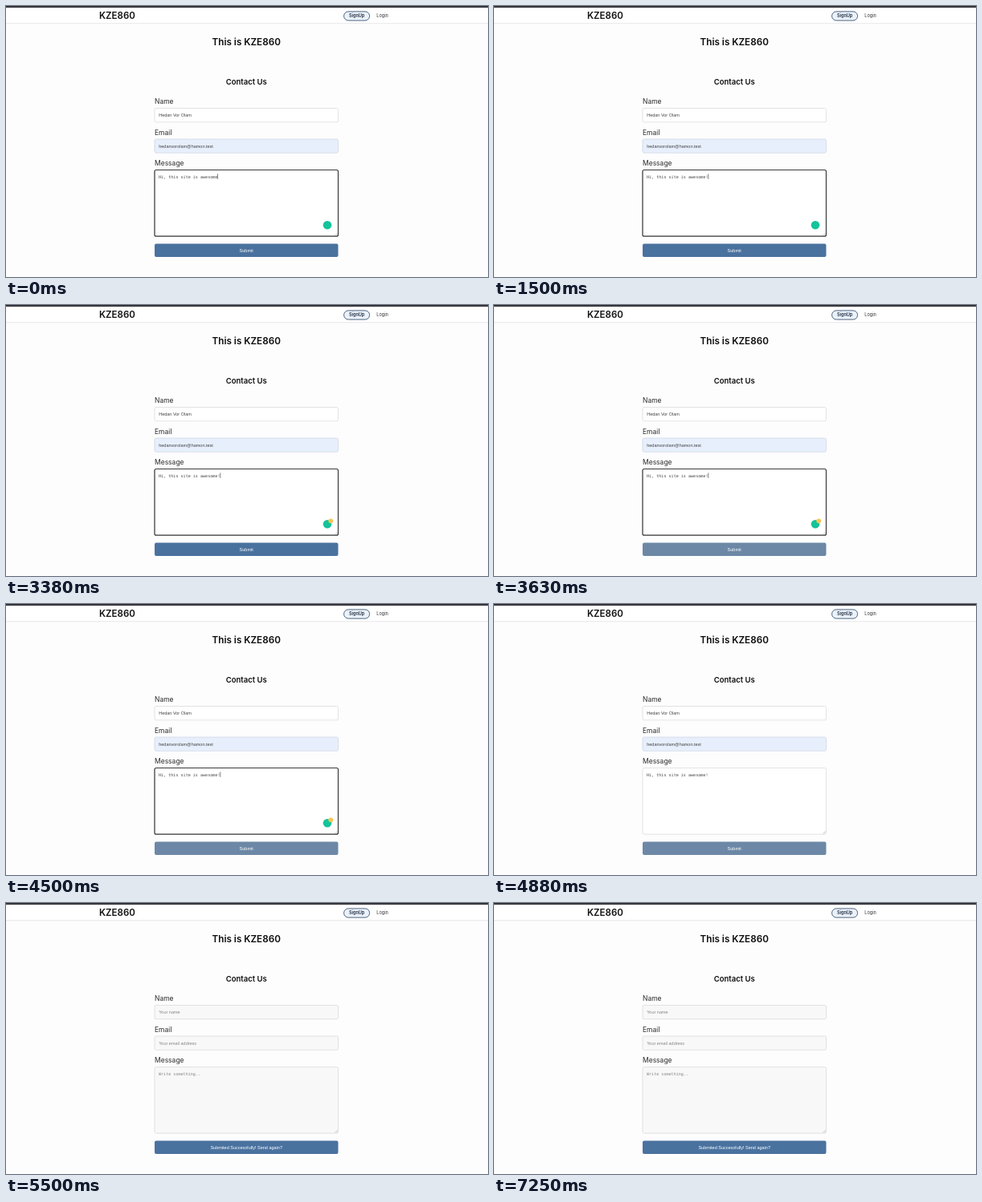
These frames come from a looping animation (600x338 px, 8 s). An HTML page with a canvas:

```html
<!DOCTYPE html>
<html lang="en">
<head>
<meta charset="utf-8">
<title>Contact form</title>
<style>
html, body { margin: 0; width: 100%; height: 100%; overflow: hidden; background: #fdfdfe; }
canvas { display: block; width: 600px; height: 338px; }
</style>
</head>
<body>
<canvas id="stage"></canvas>
<script>
const W = 600, H = 338, LOOP = 8000;
const canvas = document.getElementById('stage');
const ctx = canvas.getContext('2d');
const ratio = window.devicePixelRatio || 1;
canvas.width = W * ratio;
canvas.height = H * ratio;

const SANS = '"Liberation Sans", Arial, sans-serif';
const MONO = '"DejaVu Sans Mono", monospace';
const WEB = 'Inter, sans-serif';
const LEFT = 185, WIDTH = 228.5, MID = 299.2;
const SITE = 'KZE860';

// Times in ms
const TYPED = 1130, BADGE = 2000, HOVER = 3630, BLUR = 4750, RELOAD = 5380, STYLED = 5500;
const BLINK = 530;

// Vertical layout before and after the web font is loaded
const plain = {
  logo: 13.6, nav: 11.5, pill: 4.2, line: 17, title: 47, heading: 91.5,
  labels: [111, 147, 183], boxes: [115.3, 151.3, 187.3], button: 279.5,
  face: SANS, sizes: { logo: 12, title: 12, heading: 9.36, label: 8, nav: 5.5 },
  bold: 700, medium: 700
};
const styled = {
  logo: 16.1, nav: 14.1, pill: 6.9, line: 21, title: 49.1, heading: 97.6,
  labels: [122.1, 160.5, 199], boxes: [127.5, 166, 204.5], button: 296.4,
  face: WEB, sizes: { logo: 11.5, title: 11.7, heading: 9.5, label: 8.5, nav: 5.5 },
  bold: 600, medium: 500
};

function text(str, x, y, size, color, face, weight = 400, align = 'left') {
  ctx.font = `${weight} ${size}px ${face}`;
  ctx.textAlign = align;
  ctx.fillStyle = color;
  ctx.fillText(str, x, y);
}

function box(x, y, w, h, r, fill, stroke, line = 0.6) {
  ctx.beginPath();
  ctx.roundRect(x, y, w, h, r);
  ctx.fillStyle = fill;
  ctx.fill();
  if (!stroke) return;
  ctx.strokeStyle = stroke;
  ctx.lineWidth = line;
  ctx.stroke();
}

function dot(x, y, r, color) {
  ctx.beginPath();
  ctx.arc(x, y, r, 0, Math.PI * 2);
  ctx.fillStyle = color;
  ctx.fill();
}

function drawPage(p) {
  ctx.fillStyle = '#fdfdfe';
  ctx.fillRect(0, 0, W, H);
  ctx.fillStyle = '#fff';
  ctx.fillRect(0, 0, W, p.line);
  ctx.fillStyle = '#ededf0';
  ctx.fillRect(0, p.line, W, 1);
  ctx.fillStyle = '#f8f8fa';
  ctx.fillRect(0, p.line + 1, W, 1);
  ctx.fillStyle = '#38383c';
  ctx.fillRect(0, 0, W, 2);
  ctx.fillStyle = '#d4d4d8';
  ctx.fillRect(0, 2, W, 0.6);

  const s = p.sizes;
  text(SITE, 116, p.logo, s.logo, '#111', p.face, p.bold);
  box(420.6, p.pill, 32, 11.2, 5.6, '#eaf1f9', '#3b5573', 0.9);
  text('SignUp', 436.6, p.nav, s.nav, '#1d2b40', p.face, p.bold, 'center');
  text('Login', 461.3, p.nav, s.nav, '#4c4c50', p.face, p.medium);
  text('This is ' + SITE, MID, p.title, s.title, '#0c0c0c', p.face, p.bold, 'center');
  text('Contact Us', MID, p.heading, s.heading, '#0c0c0c', p.face, p.bold, 'center');
  ['Name', 'Email', 'Message'].forEach((label, i) =>
    text(label, LEFT, p.labels[i], s.label, '#2a2a2a', p.face));
}

function drawResizer(bottom) {
  ctx.strokeStyle = '#888';
  ctx.lineWidth = 0.4;
  ctx.beginPath();
  for (const d of [1.6, 3.4]) {
    ctx.moveTo(412.8 - d, bottom - 0.7);
    ctx.lineTo(412.8, bottom - 0.7 - d);
  }
  ctx.stroke();
}

function drawForm(p, values, fills, color) {
  const edge = '#d0d1d4';
  values.forEach((value, i) => {
    const y = p.boxes[i], area = i === 2;
    box(LEFT, y, WIDTH, area ? 82.7 : 17.3, 2, fills[i], i === 1 && fills[1] !== fills[0] ? '#c6cedb' : edge);
    if (area) text(value, 190, y + 10, 5.08, color, MONO);
    else text(value, 190.2, y + 10.5, 5.5, color, SANS);
  });
  drawResizer(p.boxes[2] + 82.7);
}

function drawButton(p, label, color) {
  box(LEFT, p.button, WIDTH, 16.6, 2, color);
  text(label, MID, p.button + 10.2, 5.53, '#fff', SANS, 400, 'center');
}

function caretVisible(t) {
  if (t < TYPED) return t < 500;
  return Math.floor((t - 1250 + BLINK * 2) / BLINK) % 2 === 0 || t < 1700;
}

function drawFocus(t) {
  const y = styled.boxes[2];
  ctx.globalAlpha = t < BLUR ? 1 : 0.4;
  ctx.beginPath();
  ctx.roundRect(LEFT, y, WIDTH, 82.7, 2);
  ctx.strokeStyle = '#3a3a3d';
  ctx.lineWidth = 1.2;
  ctx.stroke();
  ctx.globalAlpha = 1;
  if (t >= BLUR) return;

  if (caretVisible(t)) {
    ctx.fillStyle = '#333';
    ctx.fillRect(t < TYPED ? 263.4 : 266.6, 209.3, 0.6, 6.6);
  }
  dot(400, 273.2, 5.3, '#14c39a');
  const grow = Math.min(1, Math.max(0, (t - BADGE) / 300));
  if (grow > 0) dot(404.3, 269.3, 2.9 * (1 - (1 - grow) ** 3), '#f8c552');
}

function draw(t) {
  ctx.setTransform(ratio, 0, 0, ratio, 0, 0);
  const reloaded = t >= RELOAD;
  const p = reloaded && t < STYLED ? plain : styled;
  drawPage(p);
  if (reloaded) {
    const grey = '#f8f8f8';
    drawForm(p, ['Your name', 'Your email address', 'Write something..'], [grey, grey, grey], '#858585');
    drawButton(p, 'Submited Successfully! Send again?', '#4a729f');
    return;
  }
  const message = 'Hi, this site is awesome' + (t >= TYPED ? '!' : '');
  drawForm(p, ['Hedan Vor Olam', 'hedanvorolam@hamon.test', message], ['#fff', '#e7effc', '#fff'], '#444');
  if (t < BLUR + 125) drawFocus(t);
  drawButton(p, 'Submit', t >= HOVER ? '#6d88a6' : '#4a729f');
}

const start = performance.now();
function tick() {
  draw((performance.now() - start) % LOOP);
  requestAnimationFrame(tick);
}
tick();
</script>
</body>
</html>
```
